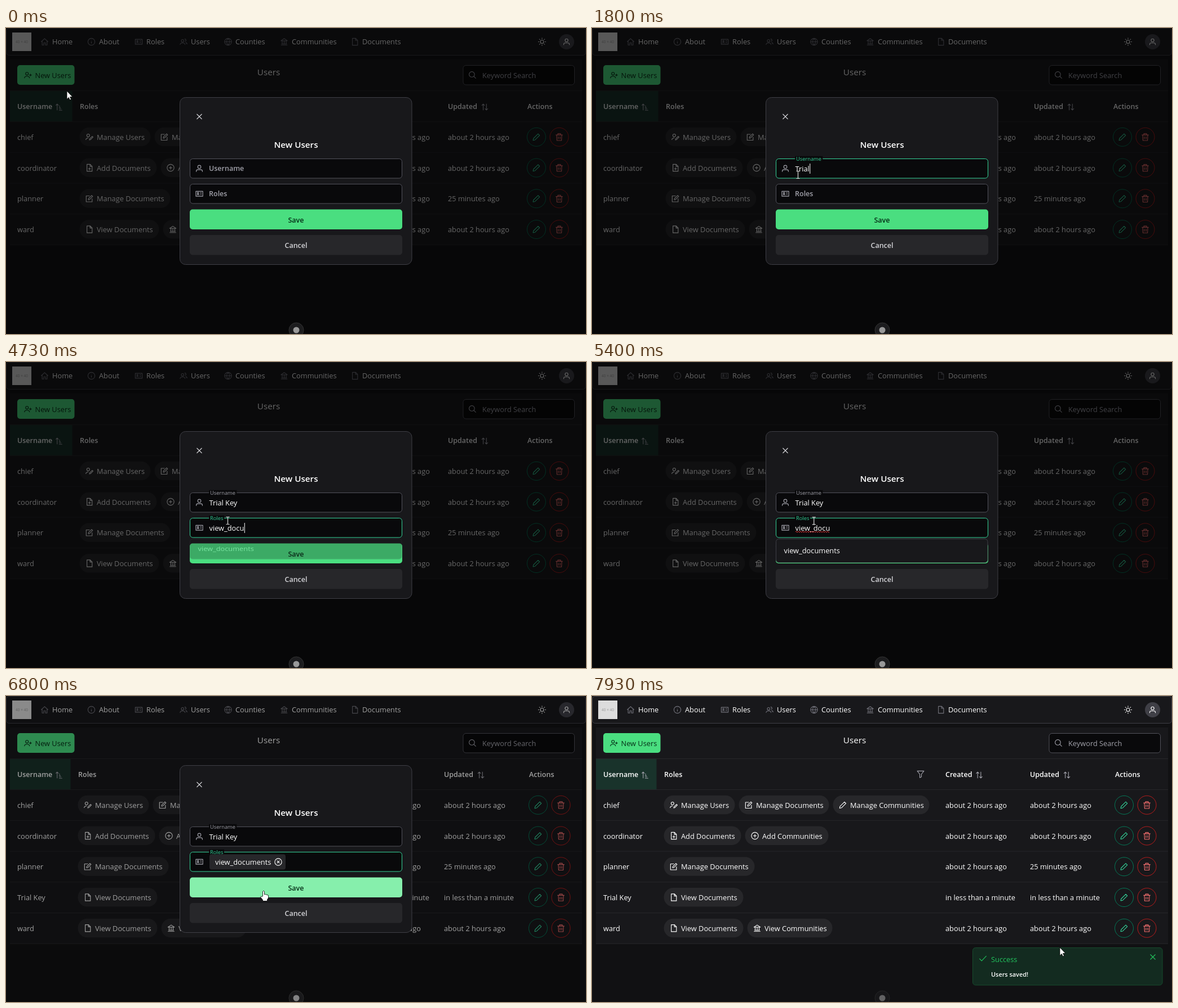
An HTML page that plays this animation: 1029 by 544 pixels, repeating every 8000 ms.

```html
<!DOCTYPE html>
<html lang="en">
<head>
<meta charset="utf-8">
<title>Account dialog</title>
<style>
  html, body { margin: 0; width: 100%; height: 100%; overflow: hidden; background: #111113; }
  svg { display: block; width: 1029px; height: 544px; }
  text { font: 12.8px "Open Sans", "Noto Sans", sans-serif; white-space: pre; }
</style>
</head>
<body>
<svg id="stage" viewBox="0 0 1029 544"></svg>
<script>
const PANEL = '#18181b', LINE = '#27272a', GRAY = '#a1a1aa', DIM = '#71717a';
const INK = '#09090b', GREEN = '#4ade80', EMERALD = '#34d399', DARK = '#052e16';
const LOOP = 8000, NEW_NAME = 'Trial Key', ROLE = 'view_documents';

// Drawing helpers
const ring = (x, y, r) => `M${x - r} ${y}a${r} ${r} 0 1 0 ${2 * r} 0a${r} ${r} 0 1 0 ${-2 * r} 0`;
const icons = {
  home: 'M1 8L8 1.5 15 8M3 6.5V14.5H6.3V10H9.7V14.5H13V6.5',
  info: ring(8, 8, 7) + 'M8 7.2V11.5M8 4.6V5.2',
  card: 'M1 3H15V13H1z' + ring(5.3, 6.5, 1.4) + 'M3 10.8Q5.3 8 7.6 10.8M9.7 6.2H12.6M9.7 9.5H12.6',
  people: ring(6, 6, 2.6) + 'M1 14Q1 10.3 6 10.3T11 14M10 2.5A2.4 2.4 0 0 1 11 7.2M12 9.6Q15 10 15 13',
  globe: ring(8, 8, 7) + 'M1 8H15M8 1Q2 8 8 15Q14 8 8 1',
  bank: 'M1.5 6L8 1.5 14.5 6zM1.5 14.5H14.5M2.5 12.3H13.5M4 6V12M8 6V12M12 6V12',
  file: 'M3 1H9.5L13.5 5V15H3zM9.3 1V5.2H13.5',
  fileAdd: 'M3 1H9.5L13.5 5V15H3zM9.3 1V5.2H13.5M8.2 7.3V12.7M5.5 10H11',
  plus: ring(8, 8, 7) + 'M8 4.7V11.3M4.7 8H11.3',
  edit: 'M8.5 2.5H1.5V14.5H13.5V8M5.7 10.5L6.2 7.8 12.5 1.5 14.6 3.6 8.3 9.9z',
  pencil: 'M1.5 14.5L2.3 10.7 11.3 1.7 14.3 4.7 5.3 13.7z',
  person: ring(8, 4.8, 3.2) + 'M1.8 15V13.5Q1.8 10.5 5 10.5H11Q14.2 10.5 14.2 13.5V15',
  personAdd: ring(6, 4.8, 2.8) + 'M.8 14Q.8 10 6 10T11.2 14M13 5V10M10.5 7.5H15.5',
  personEdit: ring(5.5, 4.8, 2.8) + 'M.8 14Q.8 10 6 10M8 14L8.5 11.8 13.7 6.6 15.3 8.2 10.1 13.4z',
  trash: 'M1.2 4H14.8M5.2 4V1.5H10.8V4M3 4L3.5 14.8H12.5L13 4M6.3 7V12M9.7 7V12',
  search: ring(6.8, 6.8, 5.5) + 'M11 11L15 15',
  sun: ring(8, 8, 3.2) + 'M8 .5V2.6M8 13.4V15.5M.5 8H2.6M13.4 8H15.5M2.7 2.7L4.2 4.2M11.8 11.8L13.3 13.3M2.7 13.3L4.2 11.8M11.8 4.2L13.3 2.7',
  filter: 'M1.3 1.5H14.7L9.7 8V13.5L6.3 15V8z',
  sort: 'M4.5 15V1.5M1.2 4.8L4.5 1.5 7.8 4.8M11.5 1V14.5M8.2 11.2L11.5 14.5 14.8 11.2',
  sorted: 'M4 15V1.5M1 4.5L4 1.5 7 4.5M8 6H10M8 9H11.5M8 12H13M8 15H15',
  close: 'M2 2L14 14M14 2L2 14',
  clear: ring(8, 8, 7) + 'M5.3 5.3L10.7 10.7M10.7 5.3L5.3 10.7',
  check: 'M1 9L5.5 13.5 15 3.5'
};
const icon = (name, x, y, size, color) =>
  `<path d="${icons[name]}" transform="translate(${x - size / 2} ${y - size / 2}) scale(${size / 16})"
    fill="none" stroke="${color}" stroke-width="${18 / size}" stroke-linejoin="round"/>`;
const text = (s, x, y, color = '#fff', style = '', attrs = '') =>
  `<text x="${x}" y="${y}" fill="${color}" style="${style}" ${attrs}>${s}</text>`;
const box = (x, y, w, h, r, fill, stroke = 'none', attrs = '') =>
  `<rect x="${x}" y="${y}" width="${w}" height="${h}" rx="${r}" fill="${fill}" stroke="${stroke}" ${attrs}/>`;
const BOLD = 'font-weight:600;font-size:12.5px', MIDDLE = 'text-anchor="middle"';

// Page
const nav = [['home', 68.5, 'Home', 82], ['info', 151.5, 'About', 165], ['card', 235.5, 'Roles', 249],
  ['people', 315, 'Users', 328], ['globe', 394, 'Counties', 407], ['bank', 493.5, 'Communities', 507],
  ['file', 619, 'Documents', 632]];
const page = box(.5, .5, 1028, 48, 5, PANEL, '#3f3f46') +
  box(11, 8, 34, 33, 0, '#ddd') + text('40 × 40', 28, 27, '#999', 'font-size:6.5px', MIDDLE) +
  nav.map(([i, ix, label, x]) => icon(i, ix, 24.5, 14, DIM) + text(label, x, 29)).join('') +
  icon('sun', 951, 24.5, 15, '#fff') +
  `<circle cx="994.5" cy="24.5" r="13.5" fill="#3f3f46"/>` + icon('person', 994.5, 24.5, 13, '#fff') +
  box(7, 56, 1015, 55.5, 0, PANEL) + box(20, 66, 101.5, 35, 5, GREEN) +
  icon('personAdd', 39, 84, 14, DARK) + text('New Users', 51.5, 88.5, DARK) +
  text('Users', 466, 84, '#fff', 'font-size:15.2px', MIDDLE) +
  box(811, 66.5, 197.5, 34.5, 5, INK, '#52525b') + icon('search', 827.5, 83.5, 14, GRAY) +
  text('Keyword Search', 845, 88.5, GRAY);

// Table
const AGO = 'about 2 hours ago', SOON = 'in less than a minute';
const viewDocs = ['file', 'View Documents', 141];
const rows = [
  ['chief', AGO, AGO, ['personEdit', 'Manage Users', 126], ['edit', 'Manage Documents', 160], ['pencil', 'Manage Communities', 171]],
  ['coordinator', AGO, AGO, ['fileAdd', 'Add Documents', 137], ['plus', 'Add Communities', 148]],
  ['planner', AGO, '25 minutes ago', ['edit', 'Manage Documents', 161]],
  [NEW_NAME, SOON, SOON, viewDocs],
  ['ward', AGO, AGO, viewDocs, ['bank', 'View Communities', 151]]
];
function table(list, [roles, created, updated, actions]) {
  const roundButton = (x, y, name, stroke, color) =>
    `<circle cx="${x}" cy="${y}" r="16.5" fill="none" stroke="${stroke}"/>` + icon(name, x, y, 14.5, color);
  let out = box(7, 111, 1015, 55.5 + 54.75 * list.length, 0, PANEL) +
    box(7, 111.5, roles - 20.5, 54.5, 0, '#19332b') +
    text('Username', 20, 144, '#fff', BOLD) + icon('sorted', 94, 140.5, 13, GRAY) +
    text('Roles', roles, 144, '#fff', BOLD) + icon('filter', 583, 139, 14, GRAY) +
    text('Created', created, 144, '#fff', BOLD) + icon('sort', created + 60, 140.5, 13, GRAY) +
    text('Updated', updated, 144, '#fff', BOLD) + icon('sort', updated + 65.5, 140.5, 13, GRAY) +
    text('Actions', actions, 144, '#fff', BOLD) + box(7, 111, 1015, 1, 0, LINE) + box(7, 166, 1015, 1, 0, LINE);
  list.forEach(([name, made, changed, ...chips], i) => {
    const y = 193.8 + 54.75 * i;
    let x = roles - .5;
    out += text(name, 20, y + 5);
    for (const [glyph, label, w] of chips) {
      out += box(x, y - 17, w, 33.5, 16.7, LINE) + icon(glyph, x + 17.5, y, 14, '#fff') + text(label, x + 30.5, y + 5);
      x += w + 7;
    }
    out += text(made, created, y + 5) + text(changed, updated, y + 5) +
      roundButton(actions + 16, y, 'pencil', '#047857', EMERALD) +
      roundButton(actions + 56.5, y, 'trash', '#b91c1c', '#f87171') + box(7, y + 27, 1015, 1, 0, LINE);
  });
  return out;
}

// Dialog and toast
const field = (id, y, label, glyph, w) =>
  box(326.5, y, 376, 34.5, 5, INK, '#52525b', `id="${id}Box"`) + icon(glyph, 343, y + 17.2, 14, GRAY) +
  `<g id="${id}Label">${box(-2.5, -11, w, 14, 0, INK)}${text(label, 0, 0, 'inherit', 'font-size:12.5px')}</g>` +
  text('', 360.5, y + 22, '#fff', '', `id="${id}Text"`);
const dialog = box(308.5, 123.5, 411.5, 297, 10, PANEL, '#3f3f46') + icon('close', 343, 157.5, 12, '#d4d4d8') +
  text('New Users', 514.5, 213, '#fff', 'font-size:15.2px;font-weight:600', MIDDLE) +
  field('name', 232.5, 'Username', 'person', 66) + field('role', 277.5, 'Roles', 'card', 36) +
  `<path id="squiggle" d="M361 302${'q1 -2 2 0t2 0'.repeat(15)}" fill="none" stroke="#d33"/>` +
  `<g id="token">${box(361, 281.5, 135, 27, 4, LINE) + text(ROLE, 371, 299.5) + icon('clear', 483, 295, 14, '#fff')}</g>` +
  box(0, 0, 1, 18, 0, '#fff', 'none', 'id="caret"') +
  box(326, 322.5, 377, 35.5, 5, GREEN, 'none', 'id="save"') + text('Save', 514.5, 345.5, DARK, BOLD, MIDDLE) +
  box(326, 368, 377, 35.5, 5, LINE) + text('Cancel', 514.5, 390.5, '#d4d4d8', BOLD, MIDDLE) +
  `<g id="list">${box(326.5, 314.5, 375.5, 42, 5, PANEL, '#3f3f46') +
    box(330.5, 318, 367.5, 35, 4, LINE, 'none', 'id="option"') + text(ROLE, 340.5, 340)}</g>`;
const toast = box(675.5, 447.5, 336.5, 66.5, 5, '#132b20', '#164a2c') + icon('check', 693.5, 466, 14, '#22c55e') +
  text('Success', 708, 473, '#22c55e') + text('Users saved!', 708, 498.5, '#fff', 'font-size:10.9px;font-weight:600') +
  icon('close', 995, 464, 12, '#22c55e');
const pointers =
  `<path id="arrow" d="M0 0V14.5L3.3 11.4 5.4 16 7.6 15 5.6 10.5H10z" fill="#fff" stroke="#000" stroke-width=".8"/>
  <path id="beam" d="M-3 -6.5H-.8L0 -6 .8 -6.5H3M0 -6V6M-3 6.5H-.8L0 6 .8 6.5H3" fill="none" stroke="#ddd" stroke-width="1.2"/>
  <path id="hand" d="M-1.5 10V1.5Q0 -1 1.5 1.5V7L3.5 6.5 4.5 7.3 6 7 7 8 8 8 8.5 9V13L6.5 16V18.5H-1.5V16.5L-5.5 11.5Q-5 9.5 -3 10.5z" fill="#fff" stroke="#000" stroke-width=".8"/>`;

const el = id => document.getElementById(id);
el('stage').innerHTML = page +
  `<g id="before">${table(rows.filter(r => r[0] !== NEW_NAME), [131, 643, 784, 925])}</g>
  <g id="after">${table(rows, [128, 627, 777, 928])}</g>
  <rect id="mask" width="1029" height="544"/>
  <g id="modal">${dialog}</g><g id="notice">${toast}</g>
  <g id="badge"><circle cx="515" cy="537" r="13" fill="#1c1c1e" stroke="#333"/><circle cx="515" cy="537" r="5.5" fill="#999"/></g>
  <g id="pointer">${pointers}</g>`;

// Timeline
const track = [[0, 108, 112], [530, 372, 276], [670, 372, 276], [1000, 365.5, 261], [2400, 365.5, 261],
  [2800, 393.5, 282], [5380, 393.5, 282], [5900, 449, 346], [6640, 449, 346], [6800, 457, 346],
  [6900, 457, 346], [7400, 401, 515], [7670, 401, 515], [7930, 830, 447]];
const nameKeys = [1330, 1400, 1530, 1670, 1730, 1870, 1930, 2000, 2070];
const roleKeys = [3400, 3590, 3595, 3670, 3870, 4070, 4130, 4200, 4330];
const NAME_FOCUS = 750, ROLE_FOCUS = 2900, PICK = 6030, SAVED = 6790;
const edits = [NAME_FOCUS, ...nameKeys, ROLE_FOCUS, ...roleKeys, PICK];

const ramp = (t, start, length) => Math.min(1, Math.max(0, (t - start) / length));
const smooth = p => p * p * (3 - 2 * p);
const easeOut = (p, power) => 1 - (1 - p) ** power;
const mix = (a, b, p) => `color-mix(in srgb, ${b} ${p * 100}%, ${a})`;
const show = (id, on) => el(id).style.display = on ? '' : 'none';
const typed = (s, keys, t) => s.slice(0, keys.filter(k => t >= k).length);

function pointerAt(t) {
  const i = track.findLastIndex(k => k[0] <= t), [t0, x0, y0] = track[i];
  const [t1, x1, y1] = track[i + 1] || [LOOP, x0, y0];
  const p = smooth(ramp(t, t0, t1 - t0));
  return [x0 + (x1 - x0) * p, y0 + (y1 - y0) * p];
}

function drawField(id, y, value, t, focus, blur) {
  const up = smooth(ramp(t, focus, 200)), lit = up - smooth(ramp(t, blur, 200));
  const label = el(id + 'Label');
  el(id + 'Box').style.stroke = mix('#52525b', EMERALD, lit);
  label.setAttribute('transform', `translate(${360 + 2 * up} ${y + 21.5 - 18 * up}) scale(${1 - .256 * up})`);
  label.lastChild.style.fill = mix(GRAY, EMERALD, lit);
  label.lastChild.style.fontWeight = up > .5 ? 400 : 600;
  el(id + 'Text').textContent = value;
}

function draw(t) {
  const picked = t >= PICK, onRole = t >= ROLE_FOCUS;
  drawField('name', 232.5, typed(NEW_NAME, nameKeys, t), t, NAME_FOCUS, ROLE_FOCUS);
  drawField('role', 277.5, picked ? '' : typed(ROLE, roleKeys, t), t, ROLE_FOCUS, LOOP);
  show('token', picked);
  show('squiggle', t >= 4830 && !picked);

  show('caret', edits.some(e => t >= e && t - e < 500));
  const textEnd = 360.5 + el(onRole ? 'roleText' : 'nameText').getComputedTextLength();
  el('caret').setAttribute('x', picked ? 500 : textEnd + .5);
  el('caret').setAttribute('y', onRole ? 286 : 241);

  const [x, y] = pointerAt(t);
  const open = ramp(t, 4700, 120);
  el('list').style.opacity = open - ramp(t, PICK, 100);
  el('list').setAttribute('transform', `translate(0 ${314 * .2 * (1 - open)}) scale(1 ${.8 + .2 * open})`);
  show('option', y > 318);
  el('save').style.fill = mix(GREEN, '#86efac', ramp(t, 6090, 200));

  const leave = easeOut(ramp(t, 6820, 150), 3), scale = 1 - .3 * leave;
  el('modal').style.opacity = 1 - leave;
  el('modal').setAttribute('transform', `translate(514.5 272) scale(${scale}) translate(-514.5 -272)`);
  const shade = 1 - easeOut(ramp(t, 6770, 150), 2);
  el('mask').style.opacity = .6 * shade;
  el('badge').style.opacity = .6 + .4 * shade;
  show('before', t < SAVED);
  show('after', t >= SAVED);

  const enter = easeOut(ramp(t, 6815, 300), 2);
  el('notice').style.opacity = enter;
  el('notice').setAttribute('transform', `translate(0 ${33 * (1 - enter)})`);

  const kind = t < 450 || t > 6950 ? 'arrow' : y > 313 ? 'hand' : 'beam';
  for (const k of ['arrow', 'beam', 'hand']) show(k, k === kind);
  el('pointer').setAttribute('transform', `translate(${x} ${y})`);
}

const start = performance.now();
function tick() {
  draw((performance.now() - start) % LOOP);
  requestAnimationFrame(tick);
}
tick();
</script>
</body>
</html>
```
